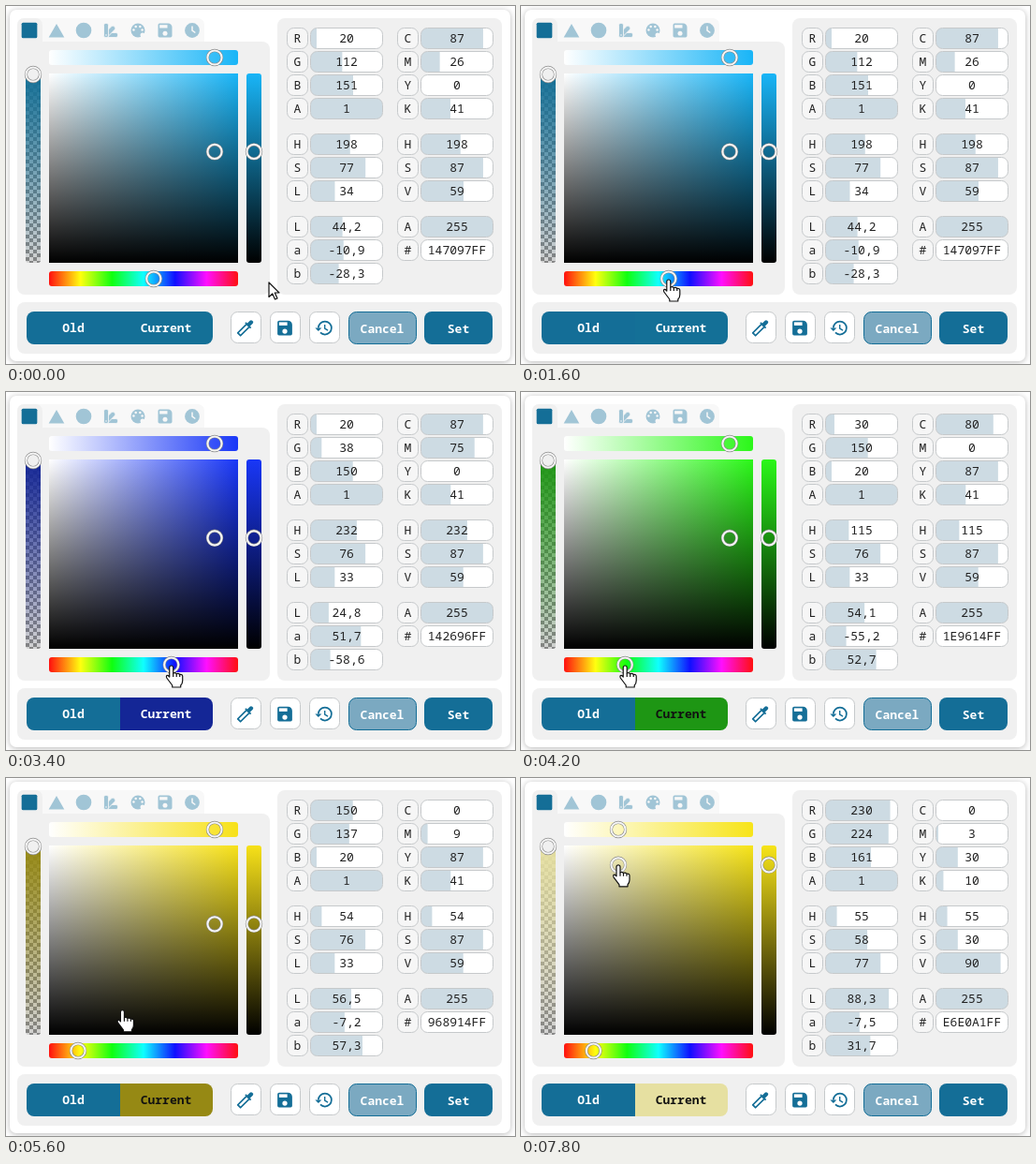
An HTML page with a canvas for the animation above (8000 ms loop, 544 by 382 pixels).

```html
<!DOCTYPE html>
<html lang="en">
<head>
<meta charset="utf-8">
<title>Color picker</title>
<style>
html, body { margin: 0; width: 100%; height: 100%; overflow: hidden; background: #fff; }
canvas { display: block; }
</style>
</head>
<body>
<canvas id="stage" width="544" height="382"></canvas>
<script>
const ctx = document.getElementById('stage').getContext('2d');
const ACCENT = '#146e97', PALE = '#a1c5d6', PANEL = '#f0f0f0', TABS = '#f8f8f8', LINE = '#c6c9cb', BAR = '#cddbe3';
const FONT = '13px "Noto Sans Mono", "DejaVu Sans Mono", monospace';
const LOOP = 8000, STEP = 200, LAB_DELAY = 170;
const LEFT = 46, TOP = 72, SIZE = 202, RIGHT = LEFT + SIZE, BOTTOM = TOP + SIZE;

const HAND = new Path2D('M-2 2a2 2 0 0 1 4 0V8q2-1 3.5 .7q2-1 3.5 .8q3-.5 3 2V16q0 3-2 5V23H1V21L-5 13q-1-3 1.5-2.5L-2 12z');
const ARROW = new Path2D('M0 0V15.5L3.8 12L6.5 18L9 17L6.3 11H11z');

// Eases a value through moves of the form [begin, end, target].
function track(t, value, ...moves) {
  return moves.reduce((from, [begin, end, to]) => {
    const p = Math.min(1, Math.max(0, (t - begin) / (end - begin)));
    return from + (to - from) * p * p * (3 - 2 * p);
  }, value);
}

function stateAt(t) {
  const h = track(t, 198, [1900, 2910, 300], [2910, 4100, 115], [4300, 5000, 54], [6000, 8000, 54.8]);
  const s = track(t, .87, [6250, 6850, .91], [7050, 7640, .3]);
  const v = track(t, .592, [1600, 1900, .59], [6250, 6850, .914], [7050, 7640, .902]);
  const satX = track(t, 223, [6250, 6850, 221], [7050, 7640, 104]);
  const hueX = LEFT + h / 360 * SIZE + .7;
  const valueY = BOTTOM - v * SIZE + 1;
  const x = track(t, 281, [300, 1300, hueX], [5200, 6250, satX]);
  const y = track(t, 295, [300, 1300, 292], [5200, 6250, valueY]);
  return { h, s, v, satX, hueX, valueY, x, y };
}

function hsvToRgb({ h, s, v }) {
  return [5, 3, 1].map(n => {
    const k = (n + h / 60) % 6;
    return Math.round(255 * v * (1 - s * Math.max(0, Math.min(k, 4 - k, 1))));
  });
}

function rgbToHue([r, g, b]) {
  const max = Math.max(r, g, b), d = max - Math.min(r, g, b);
  const sector = max === r ? (g - b) / d : max === g ? 2 + (b - r) / d : 4 + (r - g) / d;
  return (sector * 60 + 360) % 360;
}

function rgbToLab(rgb) {
  const [r, g, b] = rgb.map(c => (c /= 255) > .04045 ? ((c + .055) / 1.055) ** 2.4 : c / 12.92);
  const f = n => n > .008856 ? Math.cbrt(n) : 7.787 * n + 16 / 116;
  const x = f((.4124 * r + .3576 * g + .1805 * b) / .9505);
  const y = f(.2126 * r + .7152 * g + .0722 * b);
  const z = f((.0193 * r + .1192 * g + .9505 * b) / 1.089);
  return [116 * y - 16, 500 * (x - y), 200 * (y - z)];
}

const css = (rgb, alpha = 1) => `rgba(${rgb},${alpha})`;

function box(x, y, w, h, r, fill, stroke) {
  ctx.beginPath();
  ctx.roundRect(x, y, w, h, r);
  ctx.fillStyle = fill;
  ctx.fill();
  if (stroke) {
    ctx.lineWidth = 1;
    ctx.strokeStyle = stroke;
    ctx.stroke();
  }
}

function disc(x, y, r, fill) {
  ctx.beginPath();
  ctx.arc(x, y, r, 0, 7);
  ctx.fillStyle = fill;
  ctx.fill();
}

function line(path, width, color) {
  ctx.lineWidth = width;
  ctx.strokeStyle = color;
  ctx.stroke(new Path2D(path));
}

function text(str, x, y, color = '#222', bold = false) {
  ctx.font = (bold ? 'bold ' : '') + FONT;
  ctx.textAlign = 'center';
  ctx.fillStyle = color;
  ctx.fillText(str, x, y + 5);
}

// Each icon is drawn on a 24 x 24 grid.
const ICONS = {
  square: color => box(2, 2, 20, 20, 2, color),
  triangle(color) {
    ctx.fillStyle = color;
    ctx.fill(new Path2D('M12 3.5L22 21H2z'));
  },
  circle: color => disc(12, 12, 10, color),
  swatches(color, hole) {
    ctx.translate(6, 18);
    for (const turn of [2, 1, 0]) {
      ctx.save();
      ctx.rotate(turn * Math.PI / 4);
      box(-3, -15, 6, 18, 2, color, hole);
      ctx.restore();
    }
    disc(0, 0, 1, hole);
  },
  palette(color, hole) {
    disc(12, 12, 9, color);
    disc(18, 18, 3, hole);
    for (let i = 0; i < 4; i++) {
      const angle = Math.PI * (1 + i / 3);
      disc(12 + 5.5 * Math.cos(angle), 11.5 + 5 * Math.sin(angle), 1.5, hole);
    }
  },
  save(color, hole) {
    box(3, 3, 18, 18, [2, 5, 2, 2], color);
    box(5, 5, 10, 4, 0, hole);
    disc(12, 16, 3, hole);
  },
  clock(color, hole) {
    disc(12, 12, 9.5, color);
    line('M12 6.5V12L16 15', 1.8, hole);
  },
  history(color) {
    ctx.beginPath();
    ctx.arc(13, 12, 8, Math.PI, Math.PI * 2.75);
    ctx.lineWidth = 2;
    ctx.strokeStyle = ctx.fillStyle = color;
    ctx.stroke();
    ctx.fill(new Path2D('M1 12H9L5 16z'));
    line('M12.8 8V12.6L16.6 15', 1.6, color);
  },
  dropper(color, hole) {
    ctx.translate(12, 12);
    ctx.rotate(Math.PI / 4);
    box(-3.3, -4, 6.6, 16, 1, color);
    box(-1.4, -3.5, 2.8, 13.5, 0, hole);
    box(-2.4, -12, 4.8, 8, 2, color);
    box(-4.6, -5.5, 9.2, 2, 0, color);
  }
};

function icon(name, cx, cy, size, color, hole) {
  ctx.save();
  ctx.translate(cx - size / 2, cy - size / 2);
  ctx.scale(size / 24, size / 24);
  ICONS[name](color, hole);
  ctx.restore();
}

function gradient(horizontal, ...colors) {
  const g = horizontal ? ctx.createLinearGradient(LEFT, 0, RIGHT, 0) : ctx.createLinearGradient(0, TOP, 0, BOTTOM);
  colors.forEach((c, i) => g.addColorStop(i / (colors.length - 1), c));
  return g;
}

function knob(x, y, fill = 'transparent') {
  disc(x, y, 7.6, fill);
  ctx.lineWidth = 3.2;
  ctx.strokeStyle = '#8a8a8a';
  ctx.stroke();
  ctx.lineWidth = 2;
  ctx.strokeStyle = '#f6f6f6';
  ctx.stroke();
}

function field(x, y, label, value, part) {
  const top = y - 10.5;
  box(x + .5, top, 22, 22, 7, '#f6f6f6', LINE);
  text(label, x + 11.5, y);
  box(x + 25.5, top, 77, 22, 7, '#fff');
  ctx.save();
  ctx.clip();
  ctx.fillStyle = BAR;
  ctx.fillRect(x + 26, top, 76 * part, 22);
  ctx.restore();
  box(x + 25.5, top, 77, 22, 7, 'transparent', LINE);
  text(value, x + 64, y);
}

function drawFrame() {
  box(0, 0, 544, 382, 0, '#fff');
  ctx.save();
  ctx.shadowColor = 'rgba(0,0,0,.28)';
  ctx.shadowBlur = 6;
  ctx.shadowOffsetY = 1;
  box(4, 4, 535, 375, 7, '#fff');
  ctx.restore();
  box(12, 13, 200, 32, 7, TABS);
  box(12, 13, 27, 32, [7, 7, 0, 0], PANEL);
  box(12, 38, 270, 270, [0, 8, 8, 8], PANEL);
  box(290, 13, 240, 295, 8, PANEL);
  box(12, 316, 518, 55, 8, PANEL);
  ['square', 'triangle', 'circle', 'swatches', 'palette', 'save', 'clock'].forEach((name, i) =>
    icon(name, 25 + 29 * i, 26, 20, i ? PALE : ACCENT, TABS));
}

function drawPicker({ h, satX, hueX, valueY }, rgb) {
  const pure = css(hsvToRgb({ h, s: .9, v: .97 }));
  const tint = gradient(true, '#fff', pure);
  const rainbow = Array.from({ length: 7 }, (_, i) => `hsl(${i * 60},100%,53%)`);

  box(LEFT, 47, SIZE, 16, 3, tint);
  box(LEFT, TOP, SIZE, SIZE, 0, tint);
  box(LEFT, TOP, SIZE, SIZE, 0, gradient(false, 'rgba(0,0,0,0)', '#000'));
  box(257, TOP, 16, SIZE, 3, gradient(false, pure, '#000'));
  box(LEFT, 283, SIZE, 16, 3, gradient(true, ...rainbow));

  box(21, TOP, 16, SIZE, 3, '#d2d2d2');
  ctx.save();
  ctx.clip();
  ctx.fillStyle = '#858585';
  for (let row = 0; row * 4 < SIZE; row++)
    for (let col = (row + 1) % 2; col < 4; col += 2) ctx.fillRect(21 + col * 4, TOP + row * 4, 4, 4);
  ctx.restore();
  box(21, TOP, 16, SIZE, 3, gradient(false, css(rgb), css(rgb, 0)));

  knob(satX, 55);
  knob(satX, valueY);
  knob(265, valueY);
  knob(hueX, 291);
  knob(29, 73, PANEL);
}

function drawFields(rgb, lab) {
  const max = Math.max(...rgb), min = Math.min(...rgb), d = max - min, sum = max + min;
  const hue = rgbToHue(rgb);
  const percent = (label, p) => [label, Math.round(p * 100), p];
  const hueField = ['H', Math.round(hue), hue / 360];
  const decimal = n => n.toFixed(1).replace('.', ',');
  const hex = rgb.map(c => c.toString(16).padStart(2, '0')).join('').toUpperCase() + 'FF';

  const columns = [[
    ...rgb.map((c, i) => ['RGB'[i], c, c / 255]), ['A', 1, 1],
    hueField, percent('S', d / (sum > 255 ? 510 - sum : sum)), percent('L', sum / 510),
    ...lab.map((n, i) => ['Lab'[i], decimal(n), i ? (n + 128) / 256 : n / 100])
  ], [
    ...rgb.map((c, i) => percent('CMY'[i], 1 - c / max)), percent('K', 1 - max / 255),
    hueField, percent('S', d / max), percent('V', max / 255),
    ['A', 255, 1], ['#', hex, 0]
  ]];
  columns.forEach((column, c) => column.forEach((entry, i) => {
    const gap = i < 4 ? 0 : i < 7 ? 13 : 26;
    field(300 + 118 * c, 34 + 25 * i + gap, ...entry);
  }));
}

function drawButtons(rgb, lightness) {
  box(22, 326, 100, 35, [8, 0, 0, 8], ACCENT);
  box(122, 326, 99, 35, [0, 8, 8, 0], css(rgb));
  text('Old', 72, 343, '#fff', true);
  text('Current', 171, 343, lightness > 50 ? '#111' : '#fff', true);
  ['dropper', 'save', 'history'].forEach((name, i) => {
    box(240.5 + 42 * i, 326.5, 32, 33, 7, '#fff', LINE);
    icon(name, 256 + 42 * i, 343.5, 21, ACCENT, '#fff');
  });
  box(366.5, 326.5, 72, 34, 8, '#7ba9c1', ACCENT);
  text('Cancel', 402, 344, '#fff', true);
  box(447, 326, 73, 35, 8, ACCENT);
  text('Set', 483.5, 344, '#fff', true);
}

function drawPointer({ x, y }) {
  const inside = x >= LEFT && x <= RIGHT && (y >= TOP && y <= BOTTOM || y >= 283 && y <= 299);
  const shape = inside ? HAND : ARROW;
  ctx.save();
  ctx.translate(x, y);
  ctx.lineJoin = 'round';
  ctx.lineWidth = 1.2;
  ctx.fillStyle = '#fff';
  ctx.strokeStyle = '#111';
  ctx.fill(shape);
  ctx.stroke(shape);
  if (inside) line('M2 8V12M5.5 9V12M9 10V12', 1.2, '#111');
  ctx.restore();
}

function render(now) {
  const t = Math.floor(now % LOOP / STEP) * STEP;
  const state = stateAt(t);
  const rgb = hsvToRgb(state);
  const lab = rgbToLab(hsvToRgb(stateAt(t - LAB_DELAY)));
  drawFrame();
  drawPicker(state, rgb);
  drawFields(rgb, lab);
  drawButtons(rgb, lab[0]);
  drawPointer(state);
}

let start;
function tick(now) {
  start ??= now;
  render(now - start);
  requestAnimationFrame(tick);
}
render(0);
requestAnimationFrame(tick);
</script>
</body>
</html>
```
